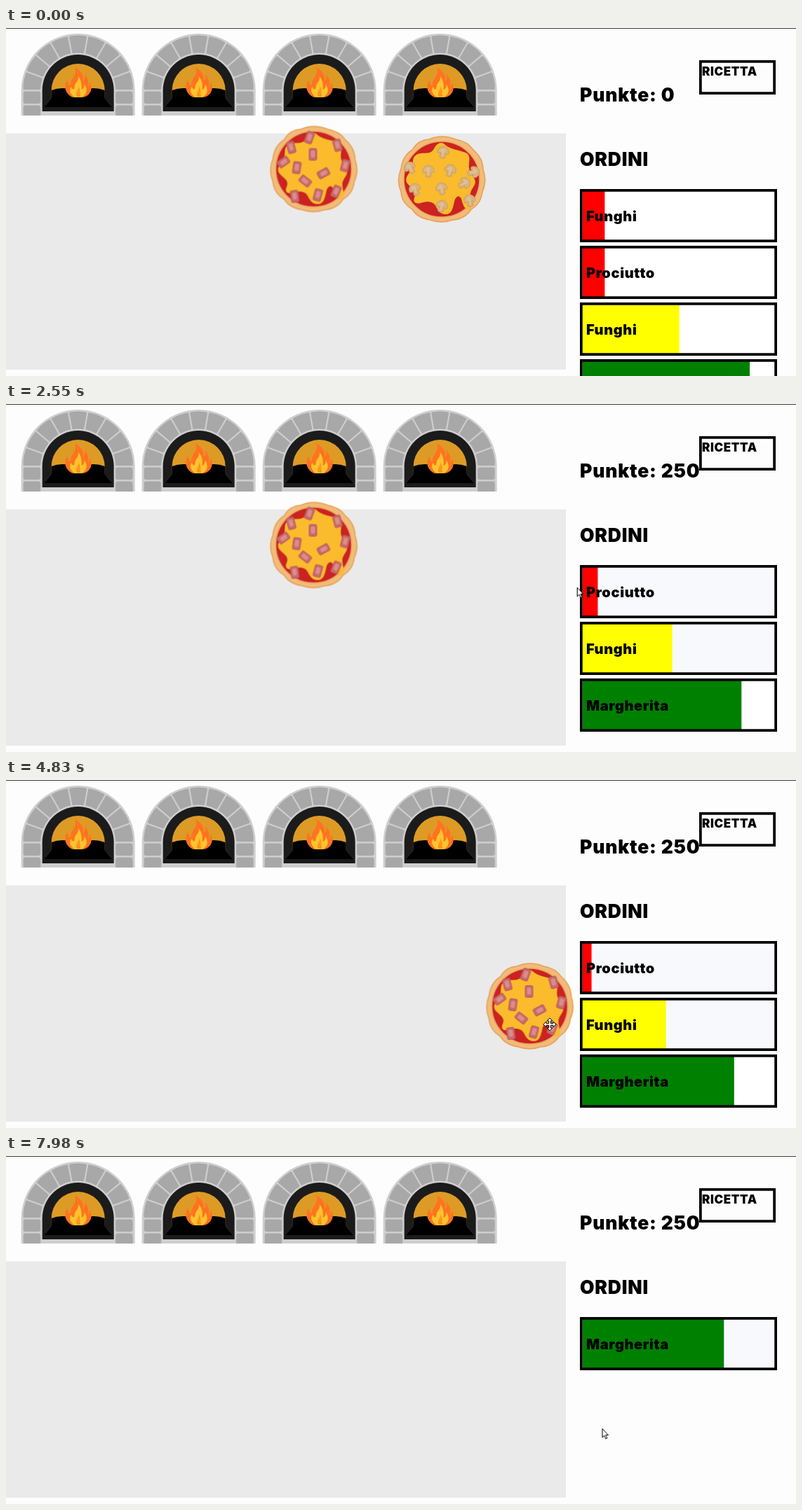
An HTML page without scripts for the animation above (8 s loop, 1126 by 497 pixels).

```html
<!DOCTYPE html>
<html lang="it">
<head>
<meta charset="utf-8">
<title>Pizzeria</title>
<style>
  html, body { margin: 0; width: 100%; height: 100%; overflow: hidden; background: #fdfdfd; }
  svg { display: block; width: 100%; height: 100%; }
  text { font: 900 20px Inter, "Noto Sans", sans-serif; letter-spacing: .03em; }
  .head { font-size: 26.5px; }
  .small { font-size: 17px; letter-spacing: .035em; }
  .frame { fill: none; stroke: #000; stroke-width: 3.75; }
  .tint { fill: #f8f9fc; }

  /* One shared 8 s clock: 1% = 80 ms */
  .bar { transform-origin: 822px 0; animation: drain 8s linear infinite; }
  .low { fill: #f00; --from: .115; --to: .001; }
  .mid { fill: #ff0; --from: .504; --to: .389; }
  .high { fill: #008000; --from: .872; --to: .737; }
  @keyframes drain { from { transform: scaleX(var(--from)); } to { transform: scaleX(var(--to)); } }

  .cut { animation: 8s step-end infinite; }
  .first { animation-name: first; }
  .later { animation-name: later; }
  .ham-order { animation-name: ham-order; }
  .second-order { animation-name: second-order; }
  .last-order { animation-name: last-order; }
  .hover { animation-name: hover; }
  .hand { animation-name: hand; }
  .arrow { animation-name: arrow; }
  .served { animation-name: served; }
  @keyframes first { 0% { visibility: visible; } 29.625%, to { visibility: hidden; } }
  @keyframes later { 0% { visibility: hidden; } 29.625%, to { visibility: visible; } }
  @keyframes served { 0% { visibility: visible; } 73.125%, to { visibility: hidden; } }
  @keyframes hover { 0% { visibility: hidden; } 5% { visibility: visible; } 98.25%, to { visibility: hidden; } }
  @keyframes hand {
    0%, 29.625%, 73.125%, to { visibility: hidden; }
    6.2%, 36.4% { visibility: visible; }
  }
  @keyframes arrow {
    0%, 6.2%, 36.4% { visibility: hidden; }
    1.125%, 29.625%, 73.125%, to { visibility: visible; }
  }
  @keyframes ham-order {
    0% { transform: translateY(81px); visibility: visible; }
    29.625% { transform: none; visibility: visible; }
    98.25%, to { transform: none; visibility: hidden; }
  }
  @keyframes second-order {
    0% { transform: translateY(162px); visibility: visible; }
    29.625% { transform: translateY(81px); visibility: visible; }
    73.125%, to { transform: translateY(81px); visibility: hidden; }
  }
  @keyframes last-order {
    0% { transform: translateY(243px); }
    29.625% { transform: translateY(162px); }
    73.125% { transform: translateY(81px); }
    98.25%, to { transform: none; }
  }

  .move { animation: 8s linear infinite; }
  .funghi { animation-name: drag-funghi; }
  .ham { animation-name: drag-ham; }
  .pointer { animation-name: pointer; }
  @keyframes drag-funghi {
    0% { transform: translate(621px, 216px); }
    12% { transform: translate(621px, 216px); animation-timing-function: ease-in; }
    15.75% { transform: translate(653.5px, 217px); }
    21.75% { transform: translate(844px, 242px); }
    24% { transform: translate(884px, 248px); animation-timing-function: ease-out; }
    27.75%, to { transform: translate(887px, 249px); }
  }
  @keyframes drag-ham {
    0% { transform: translate(438.5px, 201.5px); }
    39.75% { transform: translate(438.5px, 201.5px); animation-timing-function: ease-in; }
    43.125% { transform: translate(446.5px, 203.5px); }
    49.125% { transform: translate(740.5px, 322.5px); }
    49.5%, 64.875% { transform: translate(746.5px, 323px); }
    70.5%, to { transform: translate(855.5px, 346px); }
  }
  @keyframes pointer {
    0% { transform: translate(1140px, 60px); }
    1.125% { transform: translate(1112px, 75px); }
    3.75% { transform: translate(1011px, 195px); }
    7% { transform: translate(548px, 238px); animation-timing-function: ease-out; }
    10.125% { transform: translate(647px, 239px); }
    12% { transform: translate(647px, 239px); animation-timing-function: ease-in; }
    15.75% { transform: translate(679.5px, 240px); }
    21.75% { transform: translate(860px, 264px); }
    24% { transform: translate(896.5px, 269.5px); animation-timing-function: ease-out; }
    27.75% { transform: translate(899px, 270px); }
    29.625% { transform: translate(899px, 270px); animation-timing-function: ease-in-out; }
    37% { transform: translate(464px, 228px); }
    39.75% { transform: translate(470px, 225px); animation-timing-function: ease-in; }
    43.125% { transform: translate(510.5px, 237px); }
    49.125% { transform: translate(762px, 353.5px); }
    50.5%, 64.875% { transform: translate(775px, 349px); }
    70.5%, 75.375% { transform: translate(886.5px, 369.5px); }
    78.375%, to { transform: translate(849.5px, 389px); }
  }
</style>
</head>
<body>
<svg viewBox="0 0 1126 497">
  <defs>
    <path id="brick" d="M-10.8-76Q0-78 10.8-76L7-54.500Q0-55.500-7-54.500Z" fill="#a8a8a8" stroke="#a8a8a8" stroke-width="3" stroke-linejoin="round"/>
    <g id="bricks3">
      <use href="#brick" transform="rotate(-20)"/>
      <use href="#brick"/>
      <use href="#brick" transform="rotate(20)"/>
    </g>
    <g id="side" fill="#a8a8a8">
      <rect x="-78" y="1.5" width="24.5" height="17.5" rx="3"/>
      <path d="M-78 36V24.500q0-3 3-3h18.500q3 0 3 3V36Z"/>
    </g>

    <!-- Oven, origin at the centre of its arch -->
    <g id="oven">
      <path d="M-81 36V0A81 81 0 0 1 81 0V36Z" fill="#cecece"/>
      <use href="#bricks3" transform="rotate(-60)"/>
      <use href="#bricks3"/>
      <use href="#bricks3" transform="rotate(60)"/>
      <use href="#side"/>
      <use href="#side" transform="scale(-1 1)"/>
      <path d="M-51 30V0A51 51 0 0 1 51 0V30Z" fill="#1b1b1b"/>
      <path d="M-38 10V0A38 38 0 0 1 38 0V10Z" fill="#dd9b26"/>
      <path d="M-49 24L-38 11V0Q-26-5-12-2Q0 0 12-2Q26-5 38 0V11L49 24Z" fill="#000"/>
      <path d="M-49 24L-38 11M49 24L38 11" stroke="#2a2a2a"/>
      <path d="M-8 10C-19 5-21-7-15-15C-15-10-13-7-10-7C-13-17 1-21-5-33C4-29 9-21 7-13C10-16 10-19 9-23C16-17 15-9 14-5C16-6 17-9 17-12C22-1 17 8 7 10Z" fill="#ff7320"/>
      <path d="M-5 10C-12 5-13-1-10-5C-8 0-5-1-5-5C-5-11 2-13 0-20C6-13 5-7 5-1C8-2 9-5 9-9C14-1 13 6 5 10Z" fill="#fdc42c"/>
      <path d="M-2 9C-5 3 1 0 1-6C4 0 2 6 4 9Z" fill="#ff9420"/>
    </g>

    <g id="pizza" stroke-linejoin="round">
      <path d="M-18-57Q0-65 20-57Q37-54 45-42Q59-30 59-14Q65 2 58 18Q56 35 42 43Q33 57 16 58Q0 64-17 58Q-35 55-42 43Q-57 34-58 18Q-65 2-58-15Q-56-33-42-42Q-34-56-18-57Z" fill="#f2bb78" stroke="#e5a057" stroke-width="1.500"/>
      <circle r="54" fill="#cb2222" stroke="#eaa65f" stroke-width="1.500"/>
      <path d="M-36-35C-27-40-18-34-12-42C-8-50-2-55 4-50C13-42 24-42 34-38C43-34 38-24 39-16C40-8 47-4 48 4C47 12 40 14 41 24C42 34 46 38 38 44C32 42 30 36 28 28C25 22 20 24 18 32C16 42 14 50 6 50C-4 50-6 42-10 36C-16 30-24 32-30 34C-38 36-42 32-38 24C-35 16-44 12-49 6C-54-2-46-8-42-16C-40-24-43-31-36-35Z" fill="#fabb2c"/>
    </g>
    <g id="cube">
      <rect x="-5.500" y="-8.500" width="11" height="17" rx="2" fill="#c8696b" stroke="#b65a5c" stroke-width=".8"/>
      <rect x="-3" y="-5.500" width="6" height="10" rx="2" fill="#d98d8c"/>
    </g>
    <g id="shroom">
      <path d="M-8 1C-9-5-4-9 0-9S9-5 8 1Q5 3 3 1L4 7Q0 10-4 7L-3 1Q-5 3-8 1Z" fill="#d9b27f" stroke="#c79d68" stroke-width=".9"/>
      <path d="M-5-1Q-4-6 0-6Q3-5 2-2L1 5H-1.500V-1Z" fill="#e0bf94"/>
    </g>

    <rect id="paper" x="820" y="232" width="277" height="72" fill="#fff"/>
    <rect id="fill" x="822" y="233" width="273" height="70"/>
    <rect id="frame" class="frame" x="819.875" y="231.875" width="277.25" height="72.25"/>
  </defs>

  <rect width="1126" height="497" fill="#fdfdfd"/>
  <rect width="1126" height="1" fill="#3a3a3a"/>
  <rect y="150.500" width="798" height="337.500" fill="#eaeaea"/>

  <use href="#oven" x="102.700" y="89"/>
  <use href="#oven" x="274.700" y="89"/>
  <use href="#oven" x="446.700" y="89"/>
  <use href="#oven" x="618.700" y="89"/>

  <text class="head cut first" x="818" y="105">Punkte: 0</text>
  <text class="head cut later" x="818" y="105">Punkte: 250</text>
  <text class="head" x="818" y="197">ORDINI</text>
  <rect class="frame" x="989.875" y="47.875" width="105.250" height="45.250"/>
  <text class="small" x="992" y="68">RICETTA</text>

  <!-- Orders: paper, hover tint, then the draining bars -->
  <use href="#paper"/>
  <g class="cut ham-order"><use href="#paper"/></g>
  <g class="cut second-order"><use href="#paper"/></g>
  <g class="cut last-order"><use href="#paper"/></g>
  <use href="#fill" class="tint cut later"/>
  <use href="#fill" class="tint cut hover" y="81"/>

  <g class="cut first">
    <use href="#fill" class="bar low"/>
    <use href="#frame"/>
    <text x="827" y="275.500">Funghi</text>
  </g>
  <g class="cut ham-order">
    <use href="#fill" class="bar low"/>
    <use href="#frame"/>
    <text x="827" y="275.500">Prociutto</text>
  </g>
  <g class="cut second-order">
    <use href="#fill" class="bar mid"/>
    <use href="#frame"/>
    <text x="827" y="275.500">Funghi</text>
  </g>
  <g class="cut last-order">
    <use href="#fill" class="bar high"/>
    <use href="#frame"/>
    <text x="827" y="275.500">Margherita</text>
  </g>

  <g class="cut served">
    <g class="move ham">
      <use href="#pizza"/>
      <use href="#cube" transform="translate(-6 -45) rotate(20)"/>
      <use href="#cube" transform="translate(-32 -31) rotate(-15)"/>
      <use href="#cube" transform="translate(34 -34) rotate(-15)"/>
      <use href="#cube" transform="translate(-1 -21)"/>
      <use href="#cube" transform="translate(-43 -10) rotate(55)"/>
      <use href="#cube" transform="translate(-24 -2) rotate(8)"/>
      <use href="#cube" transform="translate(45 -5) rotate(15)"/>
      <use href="#cube" transform="translate(14 6) rotate(62)"/>
      <use href="#cube" transform="translate(-12 17) rotate(-52)"/>
      <use href="#cube" transform="translate(-27 39) rotate(-8)"/>
      <use href="#cube" transform="translate(6 37) rotate(15)"/>
      <use href="#cube" transform="translate(32 32) rotate(22)"/>
    </g>
  </g>
  <g class="cut first">
    <g class="move funghi">
      <use href="#pizza"/>
      <use href="#shroom" transform="translate(2 -38) rotate(10)"/>
      <use href="#shroom" transform="translate(-45 -16) rotate(-30)"/>
      <use href="#shroom" transform="translate(-19 -11)"/>
      <use href="#shroom" transform="translate(12 -12) rotate(15)"/>
      <use href="#shroom" transform="translate(45 -10) rotate(75)"/>
      <use href="#shroom" transform="translate(32 6) rotate(60)"/>
      <use href="#shroom" transform="translate(-38 15) rotate(-20)"/>
      <use href="#shroom" transform="translate(0 14) rotate(-10)"/>
      <use href="#shroom" transform="translate(0 39) rotate(15)"/>
      <use href="#shroom" transform="translate(40 31) rotate(-10)"/>
    </g>
  </g>

  <g class="move pointer" fill="#fff" stroke="#000" stroke-linejoin="round">
    <path class="cut hand" d="M0-9L4-5H1.300V-1.300H5V-4L9 0L5 4V1.300H1.300V5H4L0 9L-4 5H-1.300V1.300H-5V4L-9 0L-5-4V-1.300H-1.300V-5H-4Z"/>
    <path class="cut arrow" d="M.5.5V13L3.300 10.300L5.300 15L7.300 14L5.300 9.500H9Z"/>
  </g>
</svg>
</body>
</html>
```
